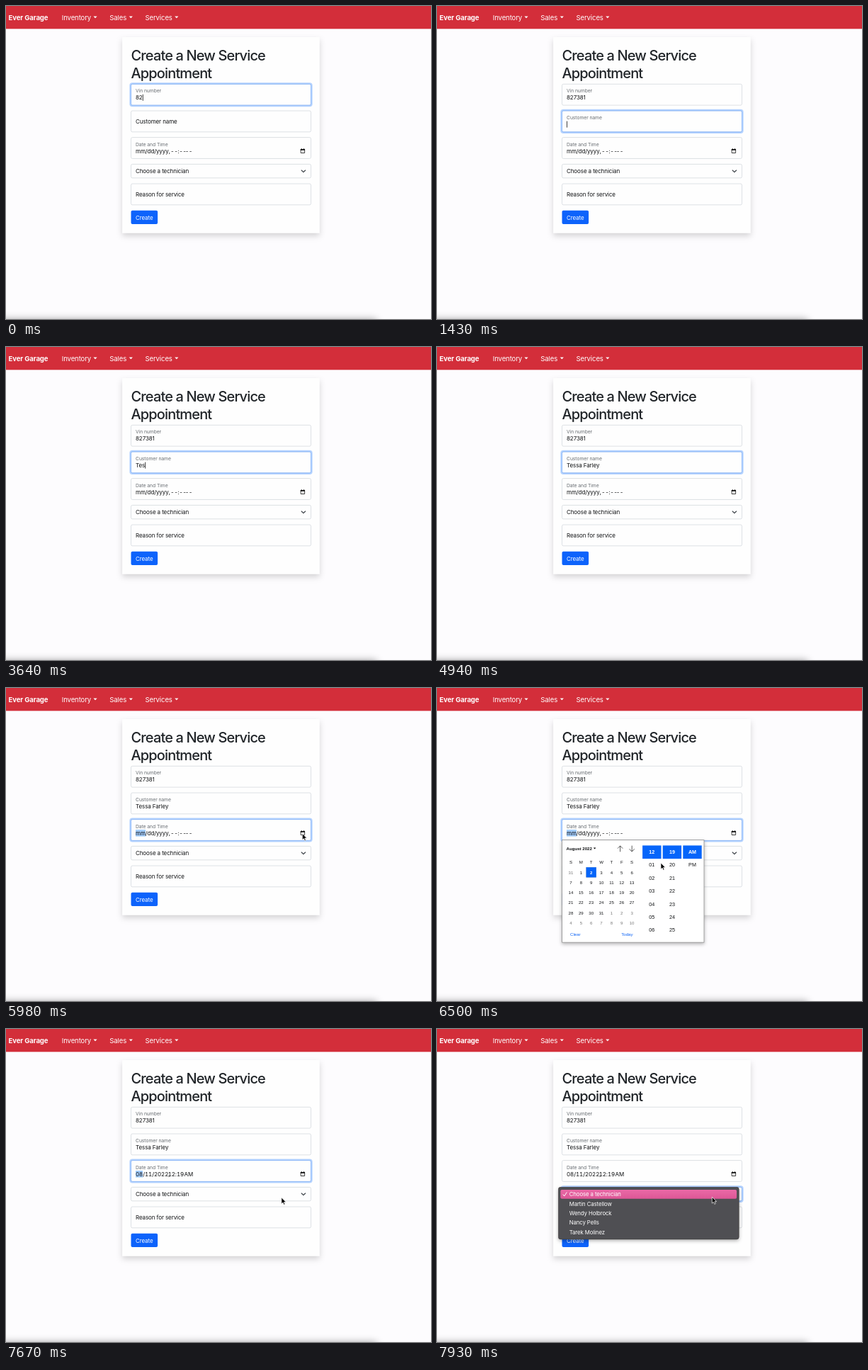
An HTML page that plays this animation: 600 by 442 pixels, repeating every 8 s.

```html
<!DOCTYPE html>
<html lang="en">
<head>
<meta charset="utf-8">
<title>Service appointment form</title>
<style>
  html, body { margin: 0; width: 100%; height: 100%; overflow: hidden; background: #fdfcfe; }
  svg { display: block; width: 600px; height: 442px; }
  text { font: 8px Inter, sans-serif; letter-spacing: -.0125em; fill: #101214; white-space: pre; }
  .nav { font-size: 9.6px; fill: #fff; }
  .brand { font-size: 9.6px; font-weight: 700; fill: #fff; }
  .title { font-size: 20px; font-weight: 500; letter-spacing: -.043em; fill: #212529; }
  .label { font-size: 6.8px; fill: #696e73; }
  .white { fill: #fff; }
  .item { font-size: 7.8px; fill: #fff; }
  .date { font-variant-numeric: tabular-nums; }
  .cal text { font: 6.1px "Liberation Sans", Arial, sans-serif; letter-spacing: 0; }
  .cal .mid { text-anchor: middle; }
  .cal .time { font-size: 7.2px; }
  .cal .dim { fill: #777; }
  .cal .link { fill: #0a62f5; }
  .cal .bold { font-weight: 700; }
  .cal .on { font-weight: 700; fill: #fff; }
  .box { fill: #fefefe; stroke: #ced4da; stroke-width: .7; }
</style>
</head>
<body>
<svg id="stage" viewBox="0 0 600 442"></svg>
<script>
const LOOP = 8000, STEP = 130;
const BLUE = '#0565fa';
const stage = document.getElementById('stage');

const text = (x, y, s, cls = '', id = '') =>
  `<text x="${x}" y="${y}" class="${cls}"${id && ` id="${id}"`}>${s}</text>`;
const rect = (x, y, w, h, attrs = '') =>
  `<rect x="${x}" y="${y}" width="${w}" height="${h}" ${attrs}/>`;
const field = (y, h) => rect(176.5, y, 254, h, 'rx="2" class="box"');
const ring = (id, y, h) => `<g id="${id}" fill="none">
  ${rect(175.4, y - 1.1, 256.2, h + 2.2, 'rx="3" stroke="#0d6efd" stroke-opacity=".3" stroke-width="2.1"')}
  ${rect(176.5, y, 254, h, 'rx="2" stroke="#86b7fe" stroke-width=".8"')}</g>`;
const navCaret = x => `<path d="M${x} 14.6h5.2l-2.6 2.7z" fill="#fff"/>`;

function navbar() {
  return rect(0, 0, 600, 32.3, 'fill="#d32e3a"') +
    text(3.5, 19.8, 'Ever Garage', 'brand') +
    text(78.7, 19.8, 'Inventory', 'nav') + navCaret(123.4) +
    text(146.2, 19.8, 'Sales', 'nav') + navCaret(173.7) +
    text(196.4, 19.8, 'Services', 'nav') + navCaret(238.2);
}

function form() {
  return rect(164.2, 44, 278.4, 276.5, 'fill="#fefefe" filter="url(#cardShadow)"') +
    text(176.5, 77, 'Create a New Service', 'title') +
    text(176.5, 101.6, 'Appointment', 'title') +
    field(110.3, 29.8) + field(148, 29.8) + field(185.6, 29.8) +
    field(223.4, 19.4) + field(251, 29.8) +
    ring('vinRing', 110.3, 29.8) + ring('nameRing', 148, 29.8) +
    ring('dateRing', 185.6, 29.8) + ring('techRing', 223.4, 19.4) +
    text(183, 122.2, 'Vin number', 'label') + text(183, 132.2, '', '', 'vin') +
    text(183, 159.8, 'Customer name', 'label', 'nameLabel') +
    text(183, 165.9, 'Customer name', '', 'nameHint') + text(183, 170.1, '', '', 'name') +
    text(183, 197.6, 'Date and Time', 'label') +
    rect(183, 200, 14, 9.6, 'fill="#a3cdfd" id="monthMark"') +
    text(183, 207.9, '', 'date', 'day') + text(0, 207.9, '', 'date', 'clock') +
    text(0, 207.9, '', 'date', 'half') +
    `<path d="M416.2 202.5h5.4v5h-5.4z" fill="none" stroke="#111" stroke-width=".8"/>
     <path d="M415.8 202.1h6.2v1.7h-6.2zM416.8 201.2h1v1.2h-1zM420 201.2h1v1.2h-1z" fill="#111"/>` +
    text(183, 236.2, 'Choose a technician') +
    `<path d="M417.2 232l2.7 2.7 2.7-2.7" fill="none" stroke="#343a40" stroke-width="1.1"
      stroke-linecap="round" stroke-linejoin="round"/>` +
    text(183, 268.9, 'Reason for service') +
    rect(176.5, 288.8, 37.6, 19.3, 'rx="2" fill="#0d63fb"') +
    text(182.9, 301.8, 'Create', 'white') +
    rect(0, 0, .8, 9, 'fill="#111" id="caret"');
}

function calendar() {
  const colX = i => 189 + i * 14.35, rowY = r => 260.3 + r * 14.25;
  let s = rect(176.6, 214.7, 200.4, 144.5, 'fill="#fff" stroke="#8b8b8b" stroke-width=".8" filter="url(#popShadow)"');
  s += text(182.6, 228.6, 'August 2022', 'bold') + '<path d="M220.8 225.4h3.6l-1.8 2.2z"/>';
  s += `<path d="M258.6 231.3v-8.4m-3.6 3.7l3.6-3.7 3.6 3.7M275.2 222.6v8.4m-3.6-3.7l3.6 3.7 3.6-3.7"
    fill="none" stroke="#333" stroke-width=".8"/>`;
  [...'SMTWTFS'].forEach((d, i) => s += text(colX(i), 248.3, d, 'mid'));
  s += rect(colX(2) - 6.9, rowY(0) - 7, 13.8, 13.8, 'fill="none" stroke="#999" stroke-width=".7"');
  s += rect(0, 0, 14.2, 14.2, `fill="${BLUE}" id="dayMark"`);
  for (let k = 0; k < 42; k++) {
    const off = k < 1 || k > 31, d = k < 1 ? 31 : k > 31 ? k - 31 : k;
    s += text(colX(k % 7), rowY(k / 7 | 0) + 2.2, d, off ? 'mid dim' : 'mid', off ? '' : 'd' + d);
  }
  s += text(188, 349.7, 'Clear', 'link') + text(260.3, 349.7, 'Today', 'link');
  const columns = [
    [303.3, i => String(i ? i : 12).padStart(2, '0'), 7],
    [331.9, i => 19 + i, 7],
    [360.5, i => ['AM', 'PM'][i], 2]
  ];
  for (const [x, label, n] of columns) {
    s += rect(x - 13.2, 222.4, 26.4, 18.7, `fill="${BLUE}"`);
    for (let i = 0; i < n; i++)
      s += text(x, 234.1 + i * 18.37, label(i), i ? 'mid time' : 'mid time on');
  }
  return `<g id="calendar" class="cal">${s}</g>`;
}

function menu() {
  const people = ['Choose a technician', 'Martin Castellow', 'Wendy Holbrock', 'Nancy Pells', 'Tarek Molinez'];
  return `<g id="menu">` +
    rect(171.4, 223.3, 254.8, 73.6, 'rx="3.2" fill="#504f52" stroke="#39383a" stroke-width=".6" filter="url(#popShadow)"') +
    rect(174.3, 227, 248.8, 12.8, 'rx="2" fill="url(#pink)"') +
    '<path d="M178 233.8l1.7 2.2 3.4-5.2" fill="none" stroke="#fff" stroke-width="1" stroke-linecap="round"/>' +
    people.map((p, i) => text(186.7, 236.1 + i * 13.4, p, 'item')).join('') + '</g>';
}

stage.innerHTML = `<defs>
  <filter id="cardShadow" x="-10%" y="-10%" width="120%" height="122%">
    <feDropShadow dx="0" dy="4.1" stdDeviation="4.1" flood-opacity=".17"/></filter>
  <filter id="popShadow" x="-10%" y="-15%" width="120%" height="135%">
    <feDropShadow dx="0" dy="2" stdDeviation="2.6" flood-opacity=".3"/></filter>
  <filter id="soft" x="-10%" y="-200%" width="120%" height="500%">
    <feGaussianBlur stdDeviation="6"/></filter>
  <linearGradient id="pink" x2="0" y2="1"><stop stop-color="#ea69a6"/><stop offset="1" stop-color="#dd5796"/></linearGradient>
  </defs>` +
  rect(0, 0, 600, 442, 'fill="#fdfcfe"') +
  rect(-60, 443, 583, 30, 'fill="#000" opacity=".4" filter="url(#soft)"') +
  navbar() + form() + calendar() + menu() +
  `<path id="mouse" d="M0 0V8.9L2.1 7 3.5 10.2 5 9.5 3.6 6.5H6.4Z" fill="#000" stroke="#fff"
    stroke-width=".7" stroke-linejoin="round"/>`;

const el = {};
stage.querySelectorAll('[id]').forEach(n => el[n.id] = n);
const show = (id, on) => el[id].style.display = on ? '' : 'none';
const put = (id, s) => { if (el[id].textContent !== s) el[id].textContent = s; };

// Key press times for both typed fields
const VIN = '827381', NAME = 'Tessa Farley';
const vinKeys = [-260, 0, 260, 520, 650, 910];
const nameKeys = [3120, 3380, 3510, ...Array.from({ length: 9 }, (_, i) => 3770 + i * 81.25)];
const typed = (s, keys, t) => s.slice(0, keys.filter(k => k <= t).length);

const NAME_AT = 1300, DATE_AT = 5330, OPEN_AT = 6110, PICK_AT = 6760, CLOSE_AT = 7540, TECH_AT = 7800;

// Pointer stops: time, x, y
const stops = [[5590, 398, 246], [5850, 418.3, 205.6], [6240, 418.3, 205.6], [6700, 247, 275],
  [6860, 247, 275], [7200, 407.6, 266.2], [7410, 407.6, 266.2], [7700, 388.3, 237.2]];

function pointer(t) {
  const i = stops.findIndex(s => s[0] > t);
  if (i < 0) return stops[stops.length - 1].slice(1);
  const [a, b] = [stops[i - 1], stops[i]];
  const u = (t - a[0]) / (b[0] - a[0]), e = u * u * (3 - 2 * u);
  return [a[1] + (b[1] - a[1]) * e, a[2] + (b[2] - a[2]) * e];
}

function draw(now) {
  const t = Math.floor((now % LOOP) / STEP) * STEP;
  const name = typed(NAME, nameKeys, t);
  const inVin = t < NAME_AT, inName = !inVin && t < DATE_AT;
  const picked = t >= PICK_AT, open = t >= OPEN_AT && t < CLOSE_AT;
  const inDate = t >= DATE_AT && t < TECH_AT;

  show('vinRing', inVin);
  show('nameRing', inName);
  show('dateRing', inDate);
  show('techRing', t >= TECH_AT);
  put('vin', typed(VIN, vinKeys, t));
  put('name', name);
  show('nameLabel', !inVin);
  show('nameHint', inVin);

  put('day', picked ? '08/11/2022,' : 'mm/dd/yyyy,');
  put('clock', picked ? '12:19' : '--:--');
  put('half', picked ? 'AM' : '--');
  el.clock.setAttribute('x', picked ? 228.7 : 232.3);
  el.half.setAttribute('x', picked ? 251.6 : 253);
  show('monthMark', inDate);
  el.monthMark.setAttribute('width', picked ? 10 : 14);

  // Text caret: solid after a key, then blinking
  const last = Math.max(...[...vinKeys, NAME_AT, ...nameKeys].filter(k => k <= t));
  show('caret', t < DATE_AT && (t - last) % 1000 < 500);
  const box = inVin ? el.vin : el.name;
  el.caret.setAttribute('x', 183 + box.getComputedTextLength() + .2);
  el.caret.setAttribute('y', inVin ? 124.8 : 162.6);

  show('calendar', open);
  el.dayMark.setAttribute('x', (picked ? 246.4 : 217.7) - 7.1);
  el.dayMark.setAttribute('y', (picked ? 274.5 : 260.3) - 7.1);
  el.d2.setAttribute('class', picked ? 'mid' : 'mid on');
  el.d11.setAttribute('class', picked ? 'mid on' : 'mid');
  show('menu', t >= TECH_AT);

  show('mouse', t >= stops[0][0]);
  if (t >= stops[0][0]) el.mouse.setAttribute('transform', `translate(${pointer(t)})`);
}

const start = performance.now();
function tick() {
  draw(performance.now() - start);
  requestAnimationFrame(tick);
}
tick();
</script>
</body>
</html>
```
